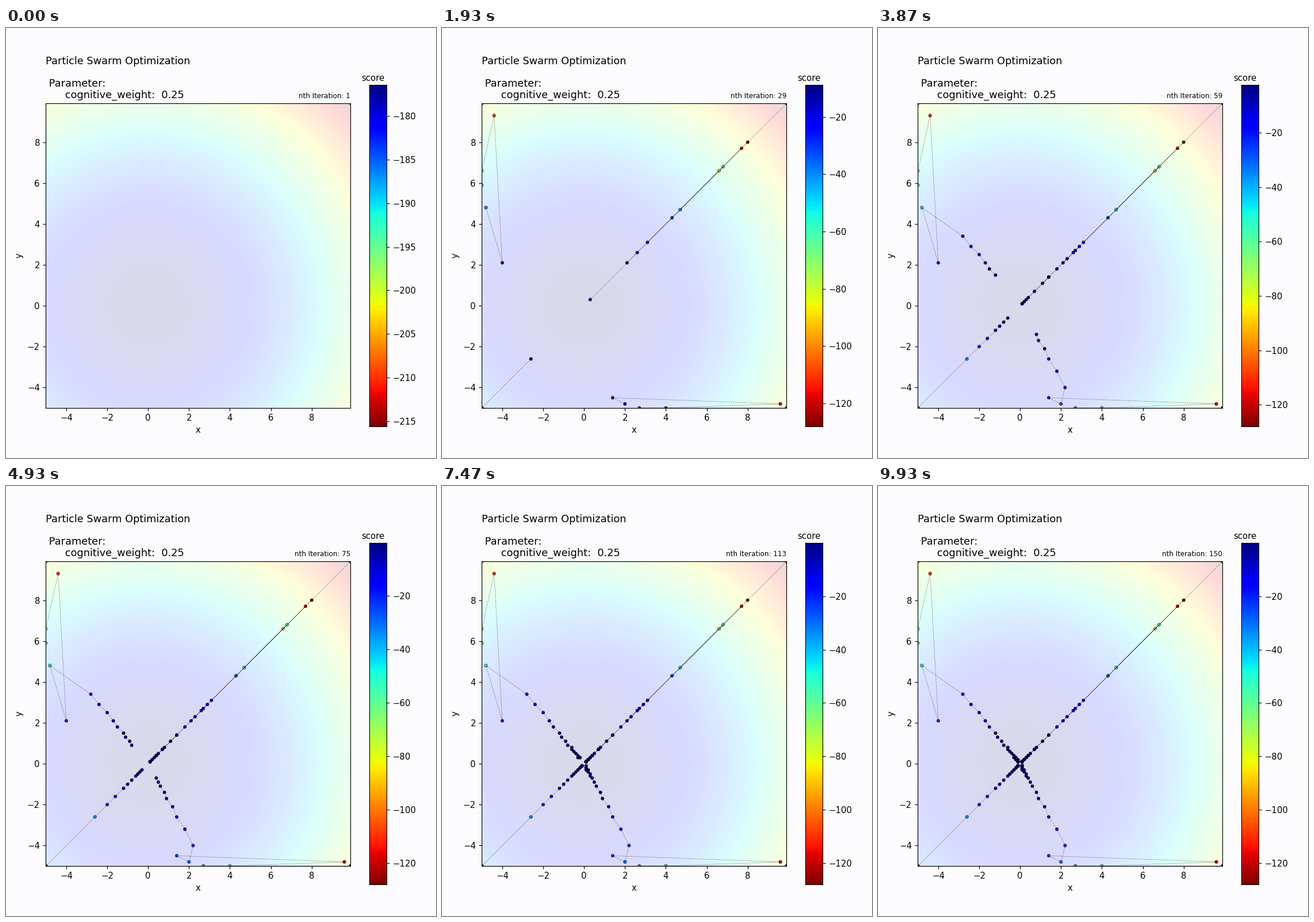
A matplotlib script for the animation above (9.99 s loop, 748 by 748 pixels).

```python
import numpy as np
import matplotlib.pyplot as plt
from matplotlib.animation import FuncAnimation

SIZE, INCHES = 748, 7
N_ITER, LOOP_MS = 150, 9990
LOW, HIGH = -5, 9.9
STEPS = 30  # moves of each particle

plt.rcParams["font.family"] = "DejaVu Sans"


def swarm_path(jumps, rate):
    """Wild first jumps, then a geometric approach to the origin on a 0.1 grid."""
    jumps = np.array(jumps, dtype=float)
    k = np.arange(1, STEPS - len(jumps) + 1)[:, None]
    dist = np.round(np.abs(jumps[-1]) * rate ** k, 1)
    return np.vstack([jumps, np.sign(jumps[-1]) * np.maximum(dist, 0.1)])


def diagonal(values, rate):
    return swarm_path([(v, v) for v in values], rate)


def score(points):
    return -(points ** 2).sum(axis=-1)


# The particles move in turn.
paths = [
    diagonal([9.9, 4.3, 3.1, 6.8, 2.6, 0.3, 1.4], 0.5),
    swarm_path([(-5, 9.9), (-5, 5.9), (-5, 6.6), (-4.4, 9.3), (-4, 2.1),
                (-4.8, 4.8), (-2.8, 3.4)], 0.85),
    swarm_path([(9.9, -5), (2.7, -5), (4, -5), (9.6, -4.8), (1.4, -4.5),
                (2, -4.8), (2.2, -4)], 0.81),
    diagonal([-5] * 5 + [-2.6], 0.78),
    diagonal([8, 4.7, 7.7, 6.6, 2.1, 2.7, 2.9], 0.78),
]

fig = plt.figure(figsize=(INCHES, INCHES), dpi=SIZE / INCHES,
                 facecolor="#fcfcfe")


def add_axes(left, top, width, height):
    """Axes from a pixel box measured from the top left."""
    box = (left, SIZE - top - height, width, height)
    return fig.add_axes([v / SIZE for v in box])


ax = add_axes(69.3, 131, 530, 530)
grid = np.arange(-50, 100) / 10
surface = -(grid[None, :] ** 2 + grid[:, None] ** 2)
ax.imshow(surface, cmap="jet_r", alpha=0.15, origin="lower",
          extent=(LOW, HIGH, LOW, HIGH), aspect="auto")
ax.set(xlim=(LOW, HIGH), ylim=(LOW, HIGH), xlabel="x", ylabel="y")
ax.set_title("Particle Swarm Optimization\n\n Parameter:\n"
             "      cognitive_weight:  0.25", loc="left", fontsize=12,
             linespacing=1.12)
counter = ax.set_title("", loc="right", fontsize=8)

cax = add_axes(632.1, 99, 29.8, 594)
bar = cax.imshow(np.linspace(0, 1, 256)[:, None], cmap="jet_r",
                 origin="lower", aspect="auto", interpolation="nearest")
cax.set_xticks([])
cax.yaxis.tick_right()
fig.text(638.8 / SIZE, 1 - 92.5 / SIZE, "score", ha="center", fontsize=10)

trails, dots = [], []
for _ in paths:
    trails += ax.plot([], [], "--", color="black", alpha=0.45, linewidth=0.5)
    dots.append(ax.scatter([], [], c=[], cmap="jet_r", vmin=-1, vmax=0,
                           marker="H", s=15, edgecolors="black",
                           linewidth=0.4))


def update(frame):
    n = frame + 1
    last = min(n, len(paths)) - 1
    counter.set_text(f"nth Iteration: {n}")
    for k, path in enumerate(paths):
        seen = path[:max(0, (n - k + 4) // 5)]
        trails[k].set_data(seen[:, 0], seen[:, 1])
        dots[k].set_visible(len(seen) > 0)
        if len(seen) == 0:
            continue
        values = score(seen)
        lo, hi = values.min(), values.max()
        # The colour bar follows the last active particle.
        if k == last:
            if lo == hi:
                lo, hi = 1.1 * lo, 0.9 * hi
            bar.set_extent((0, 1, lo, hi))
            cax.set_ylim(lo, hi)
        dots[k].set_offsets(seen)
        dots[k].set_array(values)
        dots[k].set_clim(lo, hi)
    return [*trails, *dots, counter, bar]


anim = FuncAnimation(fig, update, frames=N_ITER, interval=LOOP_MS / N_ITER,
                     init_func=lambda: update(0), repeat=True,
                     repeat_delay=0, blit=False)
plt.show()
```
